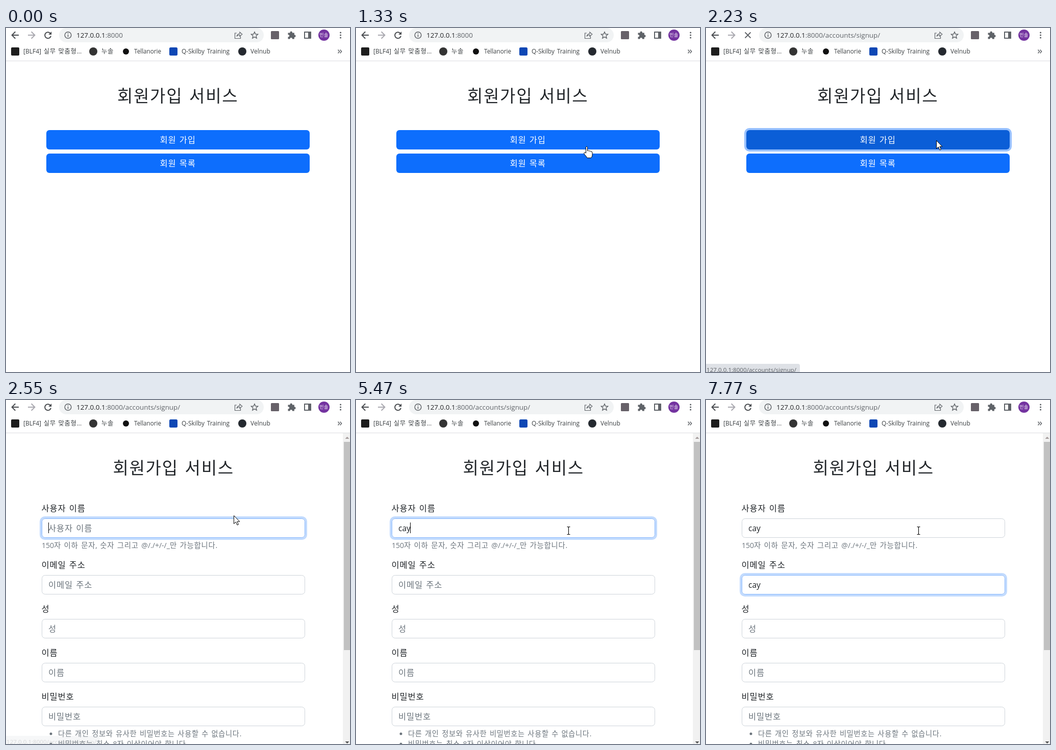
Write an HTML page that moves like this. It is 674 by 674 pixels and loops after 8 s.

```html
<!DOCTYPE html>
<html lang="ko">
<head>
<meta charset="utf-8">
<style>
  html, body { margin: 0; width: 100%; height: 100%; overflow: hidden; background: #fff; }
  svg { display: block; width: 100vw; height: 100vh; }
  text { font-family: "Open Sans", "Noto Sans CJK KR", "Noto Sans CJK", sans-serif; white-space: pre; }
  .ko { font-size: 1.03em; font-weight: 350; letter-spacing: .05em; word-spacing: .08em; }
  .line { fill: none; stroke: #5f6368; stroke-width: 1.5; }
</style>
</head>
<body>
<svg id="stage" viewBox="0 0 674 674"></svg>
<script>
const INK = '#212529', MUTED = '#6c757d', BLUE = [13, 110, 253], BLUE_HOVER = [11, 94, 215];

// Text whose Korean runs get their own spacing.
const label = (x, y, size, str, fill = INK, extra = '') =>
  `<text x="${x}" y="${y}" font-size="${size}" fill="${fill}" ${extra}>` +
  str.replace(/[가-힣 ]+/g, run => `<tspan class="ko">${run}</tspan>`) + '</text>';
const rect = (x, y, w, h, r, attrs) =>
  `<rect x="${x}" y="${y}" width="${w}" height="${h}" rx="${r}" ${attrs}/>`;
const circle = (x, y, r, attrs) => `<circle cx="${x}" cy="${y}" r="${r}" ${attrs}/>`;
const path = (d, attrs = 'class="line"') => `<path d="${d}" ${attrs}/>`;
const group = (id, ...parts) => `<g id="${id}">${parts.join('')}</g>`;

const toolbar = [
  rect(0, 0, 674, 64, 0, 'fill="#fff"'),
  rect(0, 64, 674, 1, 0, 'fill="#dadce0"'),
  path('M25 14H12M18.3 7.3L11.6 14l6.7 6.7', 'class="line" style="stroke:#4b4e52;stroke-width:2"'),
  path('M43 14h13M49.7 7.3L56.4 14l-6.7 6.7', 'class="line" style="stroke:#aaa9b0;stroke-width:2"'),
  group('reload',
    path('M86.6 10.2A6 6 0 1 0 88 15.5', 'class="line" style="stroke:#4b4e52;stroke-width:2"'),
    path('M89.2 7v6h-6z', 'fill="#4b4e52"')),
  group('stop', path('M76.5 8.5l11 11M87.5 8.5l-11 11', 'class="line" style="stroke-width:1.8"')),
  rect(104, 0, 401, 28, 14, 'fill="#f1f3f4"'),
  circle(121.5, 14, 6.3, 'class="line"'),
  path('M121.5 13v4.5M121.5 10v1.6'),
  '<text id="url" x="138" y="19" font-size="13.4" fill="#5f6368"><tspan fill="#202124">127.0.0.1</tspan>:8000<tspan id="route">/accounts/signup/</tspan></text>',
  path('M452 10h-3.5v10.5h11v-4M452 16.5q1-5 6-5.5v-3l4.8 4.3l-4.8 4.2v-3q-4 0-6 3z', 'class="line" style="stroke-width:1.2"'),
  path('M487 7.7l1.9 4.3l4.7.4l-3.6 3.1l1.1 4.6l-4.1-2.5l-4.1 2.5l1.1-4.6l-3.6-3.1l4.7-.4z', 'class="line" style="stroke-width:1.4"'),
  rect(519, 6, 16, 16, 1.5, 'fill="#676169"'),
  path('M552.5 9.5h4a2.3 2.3 0 1 1 4.4 0h4v4a2.2 2.2 0 1 1 0 4.3v3.7h-4.2a2.1 2.1 0 1 0-4.1 0h-4.1v-4.2a2.1 2.1 0 1 0 0-4z', 'fill="#5f6368"'),
  rect(585, 8, 12, 12, 0, 'class="line" style="stroke-width:2"'),
  rect(592, 8, 5, 12, 0, 'fill="#5f6368"'),
  circle(623, 14, 11, 'fill="#7434a0"'),
  label(623, 17, 8.5, '민솔', '#fff', 'text-anchor="middle"'),
  ...[9, 14, 19].map(y => circle(655.5, y, 1.6, 'fill="#5f6368"')),
  rect(10, 38, 16, 16, 2, 'fill="#1d1d1d"'),
  label(34, 50, 12, '[BLF4] 실무 맞춤형...', '#3c4043'),
  circle(171, 46, 8, 'fill="#333"'),
  label(187, 50, 12, '누솔', '#3c4043'),
  circle(235, 46, 6, 'fill="#111"'),
  label(251, 50, 11.7, 'Tellanorie', '#3c4043'),
  rect(320, 38, 16, 16, 2.5, 'fill="#0d47b5"'),
  label(344, 50, 11.9, 'Q-Skilby Training', '#3c4043'),
  circle(463, 46, 8, 'fill="#24292f"'),
  label(479, 50, 12, 'Velnub', '#3c4043'),
  path('M650.5 42.5l3 3.5l-3 3.5M654.5 42.5l3 3.5l-3 3.5'),
].join('');

const title = x => label(x, 145, 32.1, '회원가입 서비스');

const home = group('home',
  title(218),
  rect(77, 198, 520, 42, 8, 'id="buttonRing" fill="none" stroke="#98c1fe" stroke-width="4"'),
  rect(79, 200, 516, 38, 6, 'id="joinButton"'),
  rect(79, 246, 516, 38, 6, `fill="rgb(${BLUE})"`),
  label(301.5, 225, 16, '회원 가입', '#fff'),
  label(301.5, 271, 16, '회원 목록', '#fff'));

const fields = [['사용자 이름', 232], ['이메일 주소', 343], ['성', 429], ['이름', 515], ['비밀번호', 601]];
const field = ([name, y], i) =>
  label(69.5, y - 14, 16, name) +
  rect(70.5, y + .5, 515, 37, 6, 'fill="#fff" stroke="#ced4da"') +
  group('focus' + i,
    rect(68, y - 2, 520, 42, 8, 'fill="none" stroke="#c2dbfe" stroke-width="4"'),
    rect(70.5, y + .5, 515, 37, 6, 'fill="#fff" stroke="#86b7fe"')) +
  label(83, y + 25, 16, name, MUTED, `id="hint${i}"`) +
  label(83, y + 25, 15.6, '', INK, `id="typed${i}"`);

const suggestions = ['admin', '4082719356', 'minsol', '표민솔', 'pms481736@mail.test', 'pms481736'];
const dropdown = group('dropdown',
  path('M171 279H183l8-8l8 8H334q3 0 3 3V500q0 3-3 3H172q-3 0-3-3V282q0-3 3-3z',
    'fill="#fff" style="filter:drop-shadow(0 1px 1.5px #0006)"'),
  ...suggestions.map((s, i) => label(181, 306 + 36 * i, 12.6, s, '#202124')));

const form = group('form',
  title(209.5),
  ...fields.map(field),
  label(70, 290, 14, '150자 이하 문자, 숫자 그리고 @/./+/-/_만 가능합니다.', MUTED),
  circle(88, 654, 2.5, `fill="${MUTED}"`),
  label(102, 659, 13.8, '다른 개인 정보와 유사한 비밀번호는 사용할 수 없습니다.', MUTED),
  circle(88, 674, 2.5, `fill="${MUTED}"`),
  label(102, 679, 13.8, '비밀번호는 최소 8자 이상이어야 합니다.', MUTED),
  rect(83, 240, 1, 21, 0, 'id="caret" fill="#000"'),
  rect(660, 65, 14, 609, 0, 'fill="#f1f1f1"'),
  rect(662, 82, 12, 408, 0, 'fill="#c1c1c1"'),
  path('M664.5 76l4-4l4 4z', 'fill="#a39a9a"'),
  path('M664.5 669l4 4l4-4z', 'fill="#505050"'),
  dropdown);

const status = group('status',
  rect(-6, 658, 190, 30, 4, 'fill="#dee1e6"'),
  label(1, 674, 11.6, '127.0.0.1:8000/accounts/signup/', '#5f6368'));

const solid = 'fill="#fff" stroke="#000" stroke-linejoin="round"';
const cursor = group('cursor',
  path('M.5.5V16.5L4.2 13L7 19L9.5 18L6.8 12.2H11.8z', 'id="arrow" ' + solid),
  path('M-1.5 13V1.5Q0-1.5 1.5 1.5V8.5Q3.3 7 4.7 9.2Q6.5 7.8 7.8 10Q10.5 9.3 11 12V17Q11 20 8.5 22.5H1Q-1 19-5 15Q-6 11.5-3.3 11.7Z', 'id="hand" ' + solid),
  path('M-3-7.5H-1L0-6.5L1-7.5H3M0-6.5V6.5M-3 7.5H-1L0 6.5L1 7.5H3',
    'id="beam" transform="translate(.5 0)" fill="none" stroke="#000" stroke-width="1.1"'));

document.getElementById('stage').innerHTML = home + form + toolbar + status + cursor;
const $ = id => document.getElementById(id);

const LOADED = 2400, WORD = 'cay';
const cursorPath = [ // time, x, y
  [280, 622, 655], [560, 596, 560], [820, 520, 410], [1050, 474, 325], [1190, 463, 285],
  [1330, 452, 232], [1670, 452, 232], [1900, 451, 220], [2490, 451, 220],
  [2900, 417, 257], [3720, 417, 257], [3850, 416, 256]];
const typing = [ // time, field, letters, caret shown
  [LOADED, 0, 0, 1], [2790, 0, 0, 0], [3320, 0, 0, 1], [3850, 0, 0, 0], [4380, 0, 0, 1], [4930, 0, 0, 0],
  [5060, 0, 1, 1], [5270, 0, 2, 1], [5470, 0, 3, 1],
  [5940, 1, 0, 1], [6500, 1, 0, 0], [6560, 1, 1, 1], [6760, 1, 2, 1], [7240, 1, 3, 1], [7770, 1, 3, 0]];

const ramp = (t, from, to) => Math.min(1, Math.max(0, (t - from) / (to - from)));
const mix = (a, b, k) => a + (b - a) * k;
const show = (id, visible) => { $(id).style.display = visible ? '' : 'none'; };
const fade = (id, opacity) => { $(id).style.opacity = opacity; };

function cursorAt(t) {
  const next = cursorPath.findIndex(p => p[0] > t);
  if (next < 1) return cursorPath[next ? cursorPath.length - 1 : 0].slice(1);
  const [a, b] = [cursorPath[next - 1], cursorPath[next]];
  const k = ramp(t, a[0], b[0]);
  return [mix(a[1], b[1], k), mix(a[2], b[2], k)];
}

function drawCursor(t) {
  const [x, y] = cursorAt(t).map(Math.round);
  const shape = t > LOADED ? (y >= 232 ? 'beam' : 'arrow') : t > 1190 && t < 2150 ? 'hand' : 'arrow';
  show('cursor', t >= 280);
  $('cursor').setAttribute('transform', `translate(${x} ${y})`);
  for (const id of ['arrow', 'hand', 'beam']) show(id, id === shape);
}

function drawTyping(t) {
  const [, active, count, on] = typing.findLast(s => s[0] <= t) || typing[0];
  [0, 1].forEach(i => {
    const length = i < active ? WORD.length : i === active ? count : 0;
    $('typed' + i).textContent = WORD.slice(0, length);
    show('hint' + i, !length);
  });
  const swap = ramp(t, 5920, 6070);
  fields.forEach((_, i) => fade('focus' + i, [1 - swap, swap][i] || 0));
  show('caret', on);
  $('caret').setAttribute('x', 83 + Math.floor(count && $('typed' + active).getComputedTextLength()));
  $('caret').setAttribute('y', fields[active][1] + 8);
}

function draw(t) {
  const loaded = t >= LOADED, loading = t >= 2100 && !loaded;
  show('home', !loaded);
  show('form', loaded);
  show('stop', loading);
  show('reload', !loading);
  show('route', t >= 2100);
  const hover = ramp(t, 1330, 1470);
  $('joinButton').setAttribute('fill', `rgb(${BLUE.map((c, i) => Math.round(mix(c, BLUE_HOVER[i], hover)))})`);
  fade('buttonRing', ramp(t, 2030, 2180));
  fade('status', ramp(t, 1640, 1800) * (1 - ramp(t, 2430, 2590)));
  fade('dropdown', ramp(t, 2980, 3100) * (1 - ramp(t, 5060, 5200)));
  drawTyping(t);
  drawCursor(t);
}

const start = performance.now();
function tick() {
  draw((performance.now() - start) % 8000);
  requestAnimationFrame(tick);
}
tick();
</script>
</body>
</html>
```
